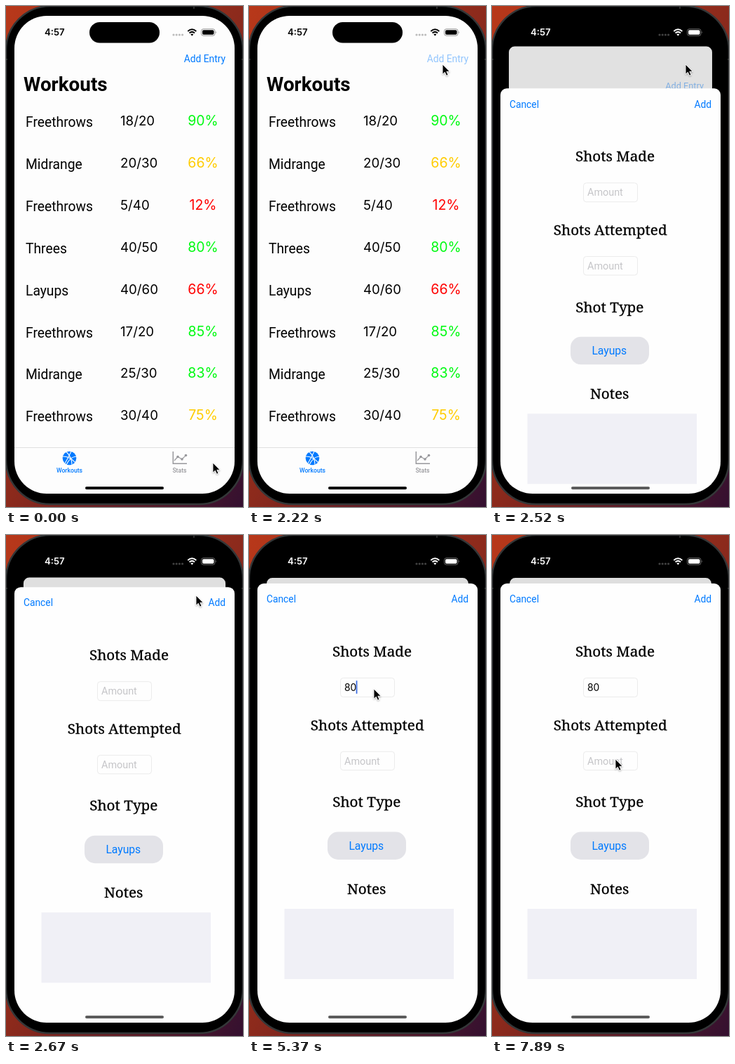
An HTML page for the animation above (8 s loop, 338x713 px).

```html
<!DOCTYPE html>
<html lang="en">
<head>
<meta charset="utf-8">
<title>Workouts</title>
<style>
  html, body { margin: 0; height: 100%; overflow: hidden; background: #000; }
  svg { display: block; width: 338px; height: 713px; font-family: Roboto, sans-serif; }
  .blue { fill: #007aff; }
  .num { font-family: Inter, sans-serif; }
  .slab { font: 20.7px "Noto Serif", serif; text-anchor: middle; stroke: #000; stroke-width: .3; }
  .nav { font-size: 13.8px; }
  .end { text-anchor: end; }
  .mid { text-anchor: middle; }
  .tab { font-size: 8.7px; font-weight: 500; text-anchor: middle; }
  .hint { font-size: 14.4px; fill: #c5c5c8; }
  .typed { font: 13.8px Inter, sans-serif; }
  .field { fill: #fefefe; stroke: #ebebeb; }
</style>
</head>
<body>
<svg viewBox="0 0 338 713">
  <defs>
    <linearGradient id="wall" x2="1" y2="1">
      <stop offset="0" stop-color="#b8381a"/>
      <stop offset=".5" stop-color="#8c2a1c"/>
      <stop offset="1" stop-color="#341030"/>
    </linearGradient>
    <clipPath id="screen"><rect x="12" y="14" width="314" height="680" rx="46"/></clipPath>
    <filter id="shadow" x="-50%" y="-50%" width="200%" height="200%">
      <feDropShadow dx="0" dy="1" stdDeviation="1" flood-opacity=".35"/>
    </filter>
  </defs>

  <rect width="338" height="713" fill="url(#wall)"/>
  <rect x="0" y="0" width="338" height="709" rx="63" stroke="#343738" stroke-width="2.5"/>
  <path d="M0 76h2M336 76h2M268 1v3" stroke="#555"/>

  <g clip-path="url(#screen)">
    <rect width="338" height="713"/>
    <g id="page">
      <rect x="12" y="14" width="314" height="680" rx="9" fill="#fdfdfd"/>
      <text id="addEntry" class="nav blue end" x="313" y="79.5">Add Entry</text>
      <text x="25" y="121" font-size="27.8" font-weight="700">Workouts</text>
      <g id="lines" stroke="#d6d6d8" stroke-width=".8"></g>
      <g id="rows"></g>
      <path d="M12 628.5H326" stroke="#e0e0e0"/>
      <circle class="blue" cx="90.5" cy="643.5" r="9.8"/>
      <path d="M81 641Q91 641 99 650M86 634.5Q94 642 94 653M93 634Q88 644 84 651M100 641Q91 642 86 653"
        fill="none" stroke="#fdfdfd" stroke-width="1.1"/>
      <text class="tab blue" x="90.5" y="664">Workouts</text>
      <g stroke="#98989c" stroke-width="1.5" fill="none">
        <path d="M238.3 634V651.2H258"/>
        <path d="M240 647L245 641.5L251 645L256.5 639.5" stroke-width="1.2"/>
      </g>
      <g fill="#98989c">
        <circle cx="245" cy="641.5" r="1.8"/><circle cx="251" cy="645" r="1.8"/><circle cx="256.5" cy="639.5" r="1.8"/>
        <text class="tab" x="247.5" y="664">Stats</text>
      </g>
      <rect id="dim" x="12" y="14" width="314" height="680" rx="9"/>
    </g>

    <g id="status">
      <text class="num" x="55" y="42.3" font-size="13.2" font-weight="600">4:57</text>
      <g opacity=".25">
        <circle cx="239" cy="41" r="1.6"/><circle cx="243.2" cy="41" r="1.6"/><circle cx="247.4" cy="41" r="1.6"/><circle cx="251.6" cy="41" r="1.6"/>
      </g>
      <g fill="none" stroke="currentColor" stroke-width="2">
        <path d="M259.3 36Q265.3 30.4 271.3 36M261.6 38.6Q265.3 35.2 269 38.6"/>
        <rect x="278.5" y="32.7" width="19.5" height="9.6" rx="3" stroke-width="1" opacity=".4"/>
      </g>
      <path d="M263.3 40.4Q265.3 38.6 267.3 40.4L265.3 42.6Z"/>
      <rect x="280" y="34.2" width="16.5" height="6.6" rx="1.8"/>
      <path d="M299 36q1.6 1.5 0 3z" opacity=".5"/>
    </g>

    <g id="sheet">
      <rect x="12" width="314" height="700" rx="9" fill="#fefefe"/>
      <text class="nav blue" x="25" y="27.3">Cancel</text>
      <text class="nav blue end" x="313" y="27.3">Add</text>
      <text class="slab" x="175.5" y="104">Shots Made</text>
      <rect class="field" x="130.5" y="134.5" width="77" height="27" rx="4"/>
      <text id="made" x="136" y="153"></text>
      <text class="slab" x="168.7" y="208.5">Shots Attempted</text>
      <rect class="field" x="130.5" y="239.2" width="77" height="26.5" rx="4"/>
      <text class="hint" x="136" y="257.6">Amount</text>
      <text class="slab" x="167.8" y="318.3">Shot Type</text>
      <rect x="112" y="353.5" width="112" height="39.5" rx="15" fill="#e3e3e8"/>
      <text class="blue mid" x="167.3" y="379" font-size="15.7">Layups</text>
      <text class="slab" x="167.7" y="442">Notes</text>
      <rect x="50.5" y="463" width="241.5" height="100" fill="#f0f0f6"/>
      <rect id="caret" width="1.7" height="18.5" fill="#3668e2"/>
    </g>
    <rect id="home" x="113" y="684" width="112" height="4" rx="2"/>
  </g>
  <rect x="119" y="23" width="100" height="29.5" rx="14.7"/>
  <path id="cursor" d="M0 0V14.2L3.3 11.2L5.6 16.2L8 15.1L5.8 10.3H10.2Z" stroke="#fff" stroke-width=".9" filter="url(#shadow)"/>
</svg>

<script>
const LOOP = 8000, STEP = 149, LEAD = 20;
const el = id => document.getElementById(id);
const green = '#00fa12', yellow = '#fc0', red = '#f00';

const entries = [
  ['Freethrows', '18/20', '90%', green], ['Midrange', '20/30', '66%', yellow],
  ['Freethrows', '5/40', '12%', red], ['Threes', '40/50', '80%', green],
  ['Layups', '40/60', '66%', red], ['Freethrows', '17/20', '85%', green],
  ['Midrange', '25/30', '83%', green], ['Freethrows', '30/40', '75%', yellow]
];
el('rows').innerHTML = entries.map(([name, shots, rate, color], i) => {
  const y = 170 + i * 59.9;
  return `<text x="28" y="${y + 2}" font-size="19.3">${name}</text>
    <text class="num" x="163" y="${y}" font-size="18.7">${shots}</text>
    <text class="num mid" x="281" y="${y}" font-size="19.5" fill="${color}">${rate}</text>`;
}).join('');
el('lines').innerHTML = Array.from({ length: 9 }, (_, i) =>
  `<path d="M28 ${133.3 + i * 59.9}H326"/>`).join('');

// Pointer stops: step, x, y
const pointer = [
  [2, 295, 650], [3, 295, 630], [5, 292, 540], [7, 289, 370], [9, 273, 180], [10, 277, 111],
  [11, 277, 104], [13, 276, 83], [17, 276, 83], [18, 271, 86], [19, 262, 97],
  [23, 184, 208], [24, 178, 219], [39, 178, 219], [41, 178, 227], [45, 177, 306], [47, 176, 319]
];
function pointerAt(k) {
  const i = pointer.findIndex(p => p[0] >= k);
  if (i < 0) return pointer.at(-1).slice(1);
  if (i === 0) return pointer[0].slice(1);
  const [a, ax, ay] = pointer[i - 1], [b, bx, by] = pointer[i];
  const f = (k - a) / (b - a);
  return [ax + (bx - ax) * f, ay + (by - ay) * f];
}

// Critically damped spring for the rising sheet
function spring(ms) {
  const x = Math.max(0, ms) * 0.0177;
  return 1 - (1 + x) * Math.exp(-x);
}

function caretOpacity(k) {
  if (k < 26 || k === 30 || k === 31 || k === 40 || k === 41 || k === 47 || k > 52) return 0;
  return k === 32 || k === 42 || k === 52 ? 0.5 : 1;
}

function draw(now) {
  // The screen refreshes in discrete steps
  const k = Math.floor((now % LOOP + LEAD) / STEP);
  const p = spring((k - 16) * STEP + 91);
  const scale = 1 - 0.083 * p;

  el('page').setAttribute('transform', `translate(169 ${14 + 47 * p}) scale(${scale}) translate(-169 -14)`);
  el('dim').setAttribute('opacity', 0.12 * p);
  el('lines').setAttribute('opacity', p > 0 ? 1 : 0);
  el('addEntry').setAttribute('opacity', k < 15 ? 1 : 0.42);
  el('sheet').setAttribute('transform', `translate(0 ${713 - 644 * p})`);
  el('home').setAttribute('fill', p > 0 ? '#5c5c5c' : '#000');
  const ink = k < 17 ? '#000' : '#fff';
  el('status').setAttribute('fill', ink);
  el('status').setAttribute('color', ink);

  const typed = '80'.slice(0, Math.max(0, k - 34));
  el('made').textContent = typed || 'Amount';
  el('made').setAttribute('class', typed ? 'typed' : 'hint');

  const second = k > 47;
  const caret = el('caret');
  caret.setAttribute('x', second ? 135.7 : 135.7 + typed.length * 8.5);
  caret.setAttribute('y', second ? 243.2 : 138.3);
  caret.setAttribute('opacity', caretOpacity(k));

  el('cursor').setAttribute('transform', `translate(${pointerAt(k)})`);
  requestAnimationFrame(() => draw(performance.now()));
}
draw(0);
</script>
</body>
</html>
```
